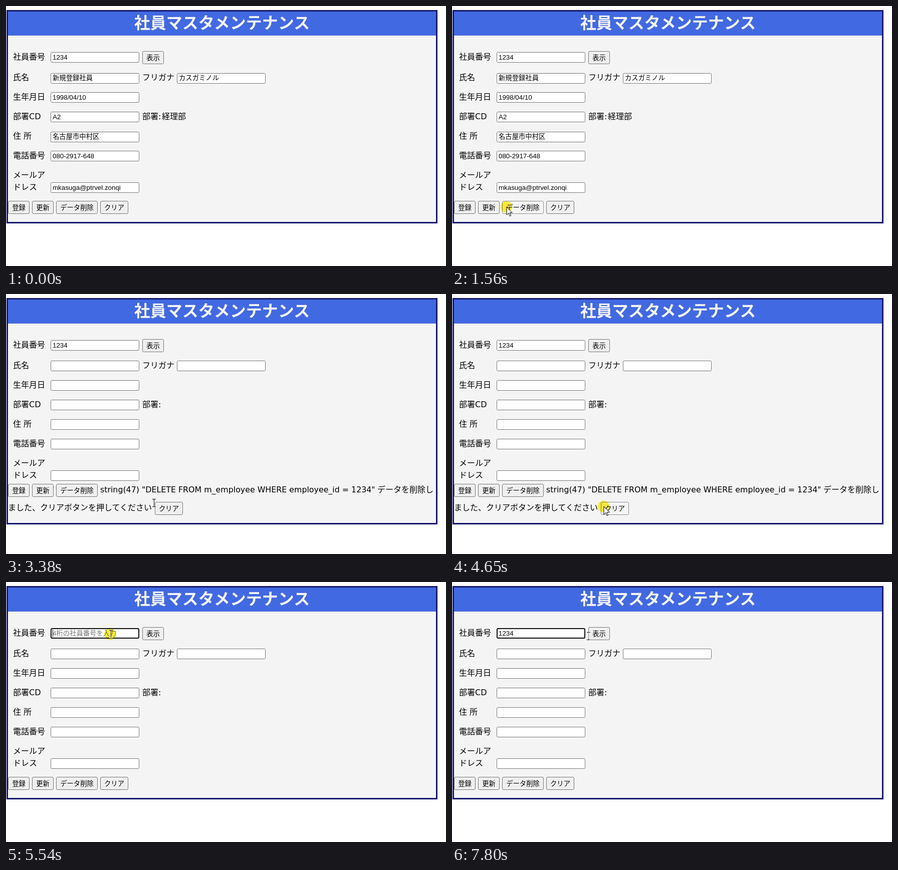
Animation of 878 by 519 pixels, one loop 8000 ms. Source, as an HTML page:

```html
<!DOCTYPE html>
<html lang="ja">
<head>
<meta charset="utf-8">
<title>社員マスタメンテナンス</title>
<style>
  html, body { margin: 0; width: 100%; height: 100%; overflow: hidden; background: #fff; }
  svg { display: block; }
  text { font: 16px "DejaVu Sans", "Noto Sans CJK JP", sans-serif; white-space: pre; }
  .title { font: bold 32px "Noto Sans CJK JP", sans-serif; fill: #f5f5f5; }
  .form { font: 13.333px "Liberation Sans", "Noto Sans CJK JP", sans-serif; }
  .hint { fill: #757575; }
  .sql { font-size: 15.84px; }
  .mid { text-anchor: middle; }
  .beam { stroke: #fff; fill: none; mix-blend-mode: difference; shape-rendering: crispEdges; }
  .click { fill: #fff01e; mix-blend-mode: multiply; opacity: .85; }
</style>
</head>
<body>
<svg id="stage" width="878" height="519" viewBox="0 0 878 519"></svg>
<script>
const LOOP = 8000, DELETED = 1760, CLEARED = 4860, FOCUSED = 5540;
const stage = document.getElementById('stage');

const text = (x, y, s, cls = '') => `<text x="${x}" y="${y}" class="${cls}">${s}</text>`;
const rect = (x, y, w, h, fill, rest = '') =>
  `<rect x="${x}" y="${y}" width="${w}" height="${h}" fill="${fill}" ${rest}/>`;

function field(x, y, value = '', focused = false, hint = '') {
  const top = /[^\x00-\x7f]/.test(value) ? y + 1 : y;   // Japanese text lowers the box
  const box = focused
    ? rect(x + 1, top + 1, 175, 19, '#fff', 'rx="2" stroke="#101010" stroke-width="2"')
    : rect(x + .5, top + .5, 176, 20, '#fff', 'rx="2" stroke="#767676"');
  return box + text(x + 4, y + 15, value || hint, value ? 'form' : 'form hint');
}

const buttonLooks = {
  idle: ['#efefef', '#767676'],
  hover: ['#e5e5e5', '#4f4f4f'],
  pressed: ['#f5f5f5', '#8d8d8d']
};
function button(x, y, w, label, look = 'idle') {
  const [fill, line] = buttonLooks[look];
  return rect(x + .5, y + .5, w - 1, 25, fill, `rx="2.5" stroke="${line}"`) +
    text(x + w / 2, y + 17.5, label, 'form mid');
}

const labels = [
  [14, 107, '社員番号'], [14, 148, '氏名'], [272, 148, 'フリガナ'], [14, 187, '生年月日'],
  [14, 226, '部署CD'], [272, 226, '部署:'], [14, 265, '住 所'], [14, 304, '電話番号'],
  [14, 343, 'メールア'], [14, 367, 'ドレス']
];
const fields = [
  [89, 133, '新規登録社員'], [341, 133, 'カスガミノル'], [89, 172, '1998/04/10'], [89, 211, 'A2'],
  [89, 250, '名古屋市中村区'], [89, 289, '080-2917-648'], [89, 352, 'mkasuga@ptrvel.zonqi']
];

function page(t) {
  const filled = t < DELETED, deleted = !filled && t < CLEARED;
  const focused = t >= FOCUSED;
  const typed = [6270, 6470, 6790, 7060].filter(k => t >= k).length;
  const id = t < CLEARED ? '1234' : '1234'.slice(0, typed);
  const caretOn = focused && (t < 6070 || t >= 6270) && t < 7600;
  const height = deleted ? 449 : 423, y = deleted ? 379 : 389;
  const deleteLook = !filled || t < 700 ? 'idle' : t < 1560 ? 'hover' : 'pressed';
  const clearLook = t < 4040 ? 'idle' : t < 4650 ? 'hover' : 'pressed';

  let out = rect(0, 0, 878, 519, '#fff') +
    rect(2.5, 9.5, 857, height, '#f4f4f4', 'stroke="#191970" stroke-width="3"') +
    rect(4, 11, 854, 48, '#4169e1') +
    text(431, 45, '社員マスタメンテナンス', 'title mid') +
    labels.map(l => text(...l)).join('') +
    field(89, 92, id, focused, '4桁の社員番号を入力') +
    fields.map(([x, top, value]) => field(x, top, filled ? value : '')).join('') +
    button(272, 90, 43, '表示') +
    button(4, y, 43, '登録') + button(52, y, 43, '更新') +
    button(100, y, 83, 'データ削除', deleteLook);
  if (filled) out += text(311, 226, '経理部');
  if (deleted) {
    out += text(188, 396, 'string(47) "DELETE FROM m_employee WHERE employee_id = 1234"', 'sql') +
      text(741, 396, 'データを削除し') +
      text(4, 432, 'ました、クリアボタンを押してください') +
      button(297, 415, 56, 'クリア', clearLook);
  } else out += button(188, y, 56, 'クリア');
  if (caretOn) out += rect(93 + Math.round(typed * 7.415), 95, 1, 15, '#000');
  return out;
}

// Sampled moves: start, step length, points as [step, x, y]
const moves = [
  [130, 70, [[0, 190, 143], [1, 203, 158], [4, 403, 275], [9, 118, 390], [10, 109, 400]]],
  [1030, 50, [[0, 108, 401], [1, 109, 401]]],
  [2890, 70, [[-1, 109, 401], [6, 290, 414], [7, 295, 417]]],
  [4040, 70, [[0, 303, 424]]],
  [4930, 76.25, [[-1, 303, 424], [8, 209, 103.5]]],
  [7600, 100, [[0, 225, 101.5], [2, 272, 108]]]
];

function pointerAt(t) {
  const move = moves.filter(m => t >= m[0]).pop();
  if (!move) return null;
  const [start, step, points] = move;
  const k = Math.floor((t - start) / step + .01);
  const next = points.findIndex(p => p[0] >= k);
  if (next < 0) return points[points.length - 1].slice(1);
  const b = points[next], a = points[next - 1] || b;
  const u = b === a ? 1 : (k - a[0]) / (b[0] - a[0]);
  return [1, 2].map(i => Math.round(a[i] + (b[i] - a[i]) * u));
}

function pointer(t) {
  const at = pointerAt(t);
  if (!at || (t >= 6270 && t < 7600)) return '';
  const [x, y] = at;
  const clicking = [[1560, DELETED], [4650, CLEARED], [FOCUSED, 5670]].some(([a, b]) => t >= a && t < b);
  const beam = t < 200 || (t >= 3380 && t < 4040) || t >= FOCUSED;
  const halo = clicking ? `<circle class="click" cx="${beam ? x - 1.5 : x - .5}" cy="${y}" r="11.5"/>` : '';
  const shape = beam
    ? '<path class="beam" d="M-3 -7.5h7M-3 7.5h7M.5 -7.5v15"/>'
    : '<path d="M0 0v16l3.7-3.5 2.6 6 2.4-1-2.6-5.8h5.2z" fill="#fff" stroke="#000"/>';
  return `${halo}<g transform="translate(${x} ${y})" style="mix-blend-mode:${beam ? 'difference' : 'normal'}">${shape}</g>`;
}

let shown = '';
function draw() {
  const t = performance.now() % LOOP;
  const scene = page(t) + pointer(t);
  if (scene !== shown) stage.innerHTML = shown = scene;
  requestAnimationFrame(draw);
}
draw();
</script>
</body>
</html>
```
